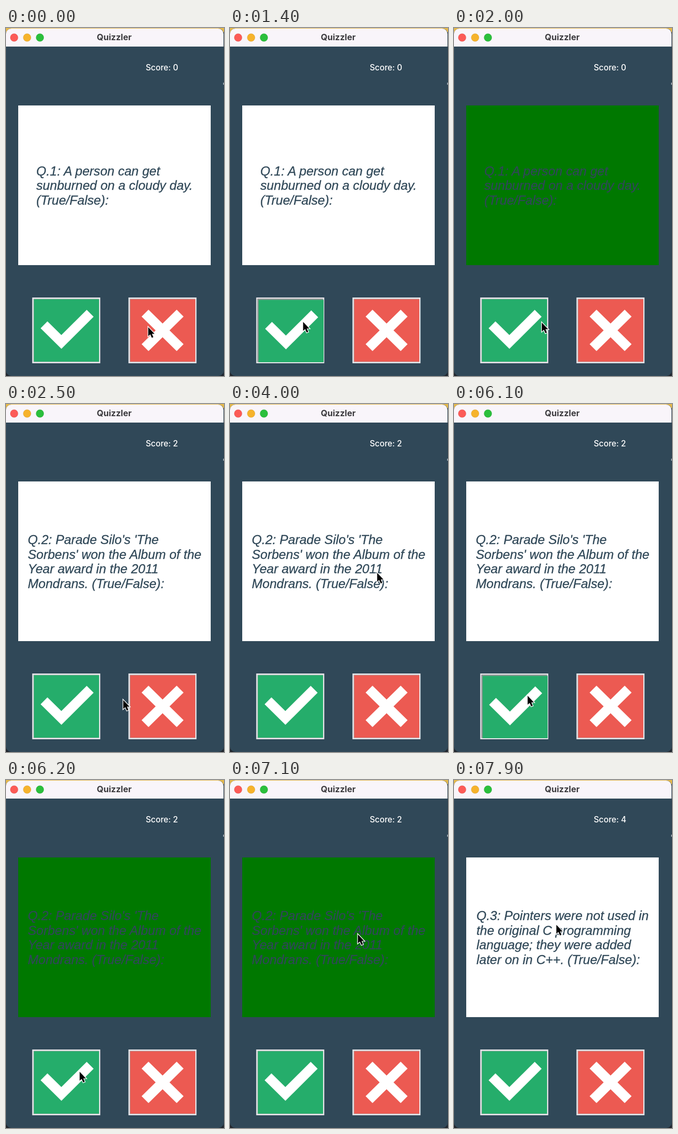
Animation, 410 px wide and 656 px high, one loop 8 s. Source, as an HTML page:

```html
<!DOCTYPE html>
<html lang="en">
<head>
<meta charset="utf-8">
<title>Quizzler</title>
<style>
  html, body { margin: 0; width: 100%; height: 100%; overflow: hidden; background: #304858; }
  svg { display: block; width: 410px; height: 656px; }
  .ui { font-family: Inter, Roboto, sans-serif; }
  #question {
    font: italic 24.1px "Liberation Sans", Arial, sans-serif;
    fill: #304858; stroke: #304858; stroke-width: .3px;
  }
</style>
</head>
<body>
<svg viewBox="0 0 410 656">
  <defs>
    <g id="frame">
      <rect width="128" height="124" fill="#e6e5e9"/>
      <rect x="2.5" y="2.5" width="123" height="119" fill="#a3a8a8"/>
    </g>
  </defs>
  <rect width="410" height="328" fill="#e3b84c"/>
  <rect y="328" width="410" height="328" fill="#20252c"/>
  <rect x="409" y="8" width="1" height="648" fill="#26323d"/>
  <rect y="1" width="409.5" height="655" rx="10" fill="#304858"/>
  <path d="M0 35V11a10 10 0 0 1 10-10H399a10 10 0 0 1 10 10V35Z" fill="#f9f5fa"/>
  <rect x="408.5" y="103" width="1.5" height="4" fill="#a9b2b8"/>
  <g stroke="#000" stroke-opacity=".12" stroke-width=".6">
    <circle cx="15.3" cy="18" r="7.4" fill="#fc5b57"/>
    <circle cx="39.7" cy="18" r="7.4" fill="#f6b32c"/>
    <circle cx="63.8" cy="18" r="7.4" fill="#2bbf3c"/>
  </g>
  <text class="ui" x="203.5" y="23.3" font-size="16" font-weight="700" text-anchor="middle" fill="#3b3a3d">Quizzler</text>
  <text class="ui" id="score" x="262.7" y="79.7" font-size="15.3" font-weight="500" fill="#fff"></text>

  <rect id="card" x="23" y="146" width="362" height="301"/>
  <g id="question"></g>

  <use href="#frame" x="49.3" y="508"/>
  <g id="check">
    <rect x="52.5" y="511.3" width="122.5" height="117.7" fill="#25ad6b"/>
    <path d="M71.5 559.5L104.2 591.7L158.3 537.7" fill="none" stroke="#fff" stroke-width="18.4"/>
  </g>
  <path id="bevel" d="M52.5 629.5V511.3H175" fill="none" stroke="#8f9294" stroke-width="2"/>

  <use href="#frame" x="230.3" y="508"/>
  <rect x="233.5" y="511.3" width="122.5" height="117.7" fill="#ec5a52"/>
  <path d="M261.5 537.5L327.5 602.5M327.5 537.5L261.5 602.5" stroke="#fff" stroke-width="18.5"/>

  <path id="cursor" d="M0 0V16.8L3.8 13.4L6.8 20L9.6 18.8L6.9 12.4H11.8Z" stroke="#fff" stroke-width="2.4" paint-order="stroke"/>
</svg>
<script>
const LOOP = 8000, STEP = 100, LEADING = 27.65, PRESS = 200, FLASH = 1000;
const $ = id => document.getElementById(id);

const questions = [
  ["Q.1: A person can get", "sunburned on a cloudy day.", "(True/False):"],
  ["Q.2: Parade Silo's 'The", "Sorbens' won the Album of the",
   "Year award in the 2011", "Mondrans. (True/False):"],
  ["Q.3: Pointers were not used in", "the original C programming",
   "language; they were added", "later on in C++. (True/False):"]
];

// times at which the check button is released
const answers = [1500, 6200];

// pointer moves: start, end, x, y
const home = [267.5, 564];
const moves = [
  [200, 700, 144, 549], [900, 1400, 137.5, 554], [1900, 2200, 220.5, 558],
  [2500, 3300, 231, 343], [3300, 3600, 293, 329], [3900, 4300, 228, 286],
  [4300, 4900, 257, 434], [5200, 5900, 138.5, 550], [6600, 7100, 240.5, 291],
  [7100, 7300, 240.5, 325], [7400, 7900, 192.5, 273]
];

function pointerAt(t) {
  let [x, y] = home;
  for (const [start, end, toX, toY] of moves) {
    const k = Math.min(1, Math.max(0, (t - start) / (end - start)));
    x += (toX - x) * k;
    y += (toY - y) * k;
  }
  return [x, y];
}

// centres the text block on the card, with its lines aligned left
let shown = -1;
function showQuestion(index) {
  if (index === shown) return;
  shown = index;
  const lines = questions[index], group = $("question");
  const top = 319.3 - lines.length * LEADING / 2;
  group.innerHTML = lines.map((line, i) =>
    `<text y="${top + i * LEADING}">${line}</text>`).join("");
  const widths = [...group.children].map(el => el.getComputedTextLength());
  group.setAttribute("transform", `translate(${204.2 - Math.max(...widths) / 2})`);
  $("score").textContent = "Score: " + 2 * index;
}

function draw(now) {
  const t = Math.floor(now % LOOP / STEP) * STEP;
  const pressed = answers.some(a => t >= a - PRESS && t < a);
  const flash = answers.some(a => t >= a && t < a + FLASH);
  showQuestion(answers.filter(a => t >= a + FLASH).length);
  $("card").setAttribute("fill", flash ? "#007800" : "#fff");
  $("bevel").style.display = pressed ? "" : "none";
  $("check").setAttribute("transform", pressed ? "translate(1 1)" : "");
  $("cursor").setAttribute("transform", `translate(${pointerAt(t)})`);
}

const start = performance.now();
function tick() {
  draw(performance.now() - start);
  requestAnimationFrame(tick);
}
tick();
</script>
</body>
</html>
```
